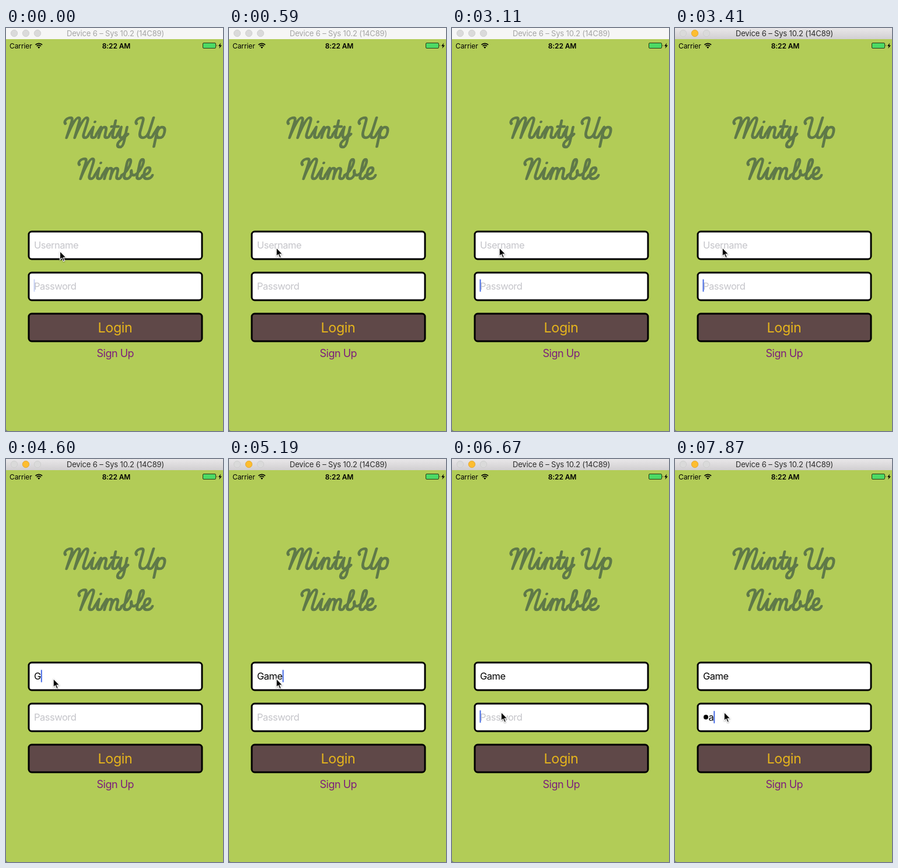
Animation of 372x687 px, one loop 8000 ms. Source, as an HTML page:

```html
<!DOCTYPE html>
<html lang="en">
<head>
<meta charset="utf-8">
<title>Login</title>
<style>
html, body { margin: 0; height: 100%; overflow: hidden; background: #b2cc57; }
svg { display: block; font-family: Inter, Roboto, sans-serif; }
.box { fill: #fff; stroke: #000; stroke-width: 3; }
.field { font-size: 16.5px; letter-spacing: -.5px; }
.script { fill: none; stroke: #5f7948; stroke-width: 4.7; stroke-linecap: round; stroke-linejoin: round; }
.mid { text-anchor: middle; }
</style>
</head>
<body>
<svg width="372" height="687" viewBox="0 0 372 687">
  <defs>
    <linearGradient id="chrome" x2="0" y2="1">
      <stop stop-color="#e9e7e9"/><stop offset="1" stop-color="#d1cfd1"/>
    </linearGradient>
  </defs>
  <path d="M0 683q0 4 4 4h-4z" fill="#6b7780"/>

  <rect id="bar" width="372" height="19"/>
  <g fill="#dadada" stroke="#cbcbcb" stroke-width=".8">
    <circle cx="14" cy="9" r="5.7"/>
    <circle id="amber" cx="34" cy="9" r="5.7"/>
    <circle cx="54" cy="9" r="5.7"/>
  </g>
  <text id="title" class="mid" x="187.5" y="14" font-size="13" letter-spacing="-.15">Device 6 – Sys 10.2 (14C89)</text>

  <text x="6" y="34.5" font-size="12" letter-spacing="-.1">Carrier</text>
  <g fill="none" stroke="#000" stroke-width="1.7">
    <path d="M50.5 28.7a8.2 8.2 0 0 1 11.6 0M52.7 31a5 5 0 0 1 7.2 0"/>
    <path d="M56.3 35l-2-2.2a2.8 2.8 0 0 1 4 0z" fill="#000" stroke="none"/>
  </g>
  <text class="mid" x="189" y="34.5" font-size="12" font-weight="600" letter-spacing="-.1">8:22 AM</text>
  <rect x="337.5" y="25.5" width="22" height="9" rx="1.5" fill="#4cd964" stroke="#2a3a14"/>
  <path d="M361 28.5q1.6 1.5 0 3zM368.2 25.5l-4.2 5.3h2.6l-1.3 4.2 4.7-5.6h-2.8z"/>

  <g id="logo" class="script" role="img" aria-label="Minty Up Nimble"></g>

  <rect class="box" x="39" y="347" width="297" height="47" rx="5"/>
  <rect class="box" x="39" y="417" width="297" height="47" rx="5"/>
  <rect class="box" x="39" y="487" width="297" height="47" rx="5" style="fill:#5f4848"/>
  <text id="user" class="field" x="48" y="375.7"></text>
  <text id="pass" class="field" y="445.7"></text>
  <circle id="dot" cx="53" cy="440" r="4"/>
  <rect id="caret" width="2" height="21" fill="#456ae4"/>
  <text class="mid" x="187" y="519" font-size="23.3" letter-spacing="-.4" fill="#e6b51c">Login</text>
  <text class="mid" x="187.3" y="561.3" font-size="18" letter-spacing="-.5" fill="#7c1c7c">Sign Up</text>

  <path id="pointer" d="M0 0v14.6l3.3-3 2.5 5.6 2.4-1-2.4-5.5h4.6z" stroke="#fff" stroke-width="1.1"
    style="filter:drop-shadow(0 1px 1px #0005)"/>
</svg>
<script>
const $ = id => document.getElementById(id);

// Joined-up letters as relative strokes; each starts and ends on the joining line.
const swash = 'm0 -18c-4 -4 0 -10 7 -10q4 0 3 8', tail = 'q0 5 4 5t4 -6';
const arch = 'c0 -8 2 -18 6 -18q4 0 4 5', loop = 'c7 -4 11 -14 11 -21q0 -6 -3 -6t-3 7v21';
const hump = 'c3 -16 8 -34 13 -34q4 0 3 8', foot = 'l-2 20q0 6 4 6t5 -6';
const glyphs = {
  M: swash + 'l-3 26' + hump + 'l-2 26' + hump + foot,
  N: swash + 'l-3 26' + hump + foot,
  U: swash + 'l-1 16q0 10 7 10t9 -14l2 -20l-3 28q0 6 4 6t5 -6',
  i: 'l5 -12v13' + tail + 'm-7 -21h.1m6.9 21',
  n: 'l5 -12v18' + arch + 'v8' + tail,
  m: 'l5 -12v18' + arch + 'v13' + arch + 'v8' + tail,
  t: 'l5 -10v-13v24' + tail + 'm-13 -13h12m1 13',
  y: 'l4 -12v10q0 8 4 8t6 -8v-10v24q0 10 -5 10t-5 -5c0 -6 8 -9 14 -17',
  p: 'l5 -12v33v-17c0 -10 2 -16 7 -16q6 0 6 9q0 9 -6 9t-6 -4',
  b: loop + 'q0 5 5 5c6 0 8 -8 5 -14c0 6 3 8 7 8',
  l: loop + 'q0 5 4 5t5 -6',
  e: 'c6 0 11 -4 11 -8q0 -5 -4 -5q-5 0 -5 9q0 10 7 10t8 -6',
  ' ': 'm11 0'
};
function letter(word, x, y) {
  const d = 'm0 0' + [...word].map(c => glyphs[c]).join('');
  $('logo').innerHTML += `<path d="${d}" transform="translate(${x} ${y}) skewX(-12)"/>`;
}
letter('Minty Up', 98, 181);
letter('Nimble', 122, 251);

// Stepped tracks: [start ms, values...]
const pointer = [
  [0, 92.5, 380.5], [150, 91, 379], [300, 87, 377], [440, 83, 375.5], [590, 81.2, 374.5],
  [5630, 90, 397], [5780, 95, 435], [5930, 86.7, 452.5], [6080, 85, 440], [6230, 84.3, 431.5]
];
const caret = [
  [0, .3], [150, 0], [890, .3], [1040, .7], [1180, 1], [1630, 0], [1920, .6], [2070, 1],
  [2660, 0], [2960, .6], [3110, 1], [3550, 0], [3850, 1], [6230, 0], [6670, 1]
];
const name = [[0, ''], [4600, 'G'], [4750, 'Ga'], [5040, 'Gam'], [5190, 'Game']];
const at = (track, t) => track.findLast(k => k[0] <= t);

function set(id, attrs) {
  for (const k in attrs) $(id).setAttribute(k, attrs[k]);
}
function fill(id, text, hint) {
  $(id).textContent = text || hint;
  set(id, { fill: text ? '#000' : '#c5c5ca' });
}

function draw(t) {
  const active = t >= 3410, masked = t >= 7870, onName = t >= 3550 && t < 6500;
  set('bar', { fill: active ? 'url(#chrome)' : '#f6f6f6' });
  set('title', { fill: active ? '#2b2b2b' : '#a4a4a4' });
  set('amber', { fill: active ? '#fdbd2f' : '#dadada', stroke: active ? '#e0a028' : '#cbcbcb' });

  const user = at(name, t)[1], pass = t >= 7420 ? 'a' : '';
  fill('user', user, 'Username');
  fill('pass', pass, 'Password');
  set('pass', { x: masked ? 57.5 : 48 });
  set('dot', { opacity: +masked });

  const field = $(onName ? 'user' : 'pass');
  const typed = (onName ? user : pass) ? field.getComputedTextLength() : -.5;
  set('caret', {
    x: +field.getAttribute('x') + typed,
    y: onName ? 359.5 : pass ? 429.5 : 428.5,
    opacity: at(caret, t)[1]
  });

  const [, x, y] = at(pointer, t);
  set('pointer', { transform: `translate(${x} ${y})` });
}

function tick() {
  draw(performance.now() % 8000);
  requestAnimationFrame(tick);
}
tick();
</script>
</body>
</html>
```
